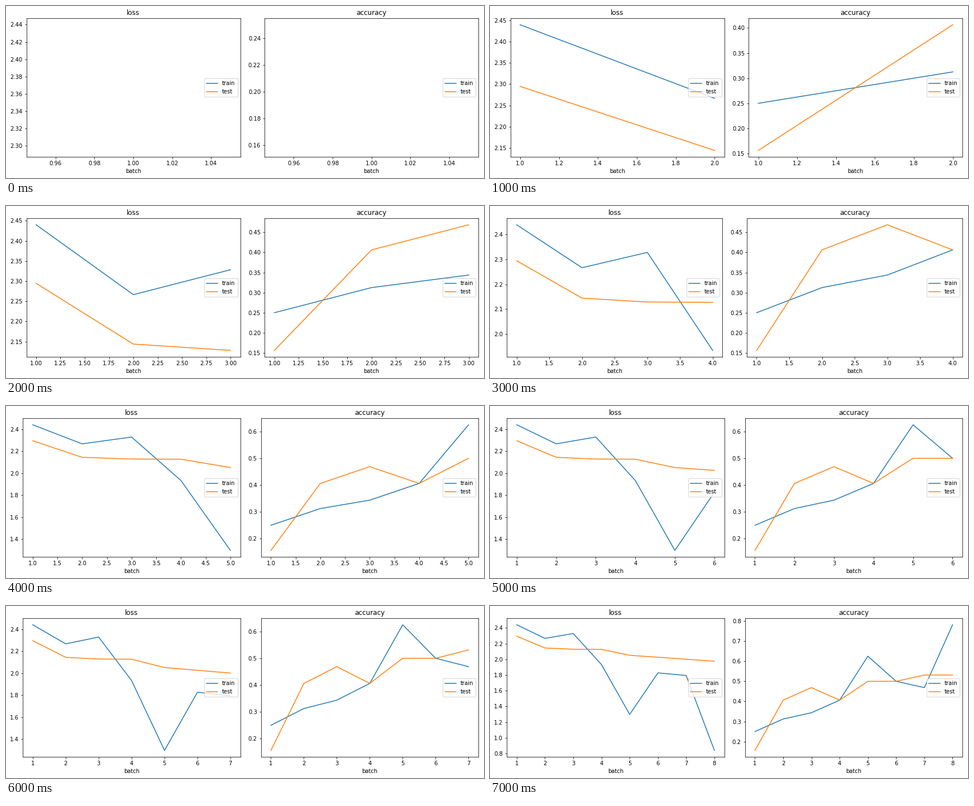
These frames come from a looping animation (856 px wide and 309 px high, 8000 ms). A matplotlib script:

```python
import numpy as np
import matplotlib.pyplot as plt
from matplotlib.animation import FuncAnimation

W, H, DPI = 856, 309, 72
TOP, BOTTOM, RIGHT = 22.46, 270.72, 846.1   # plot edges in pixels from top left
MARGIN, GAP = 14.3, 21.3                    # room beside the tick labels
DIGIT, POINT = 6.36, 3.18                   # glyph widths at 10 pt
BATCHES = 8
SAMPLES = 32                                # accuracy is hits per batch


def share(hits):
    return np.array(hits) / SAMPLES


# uneven key points first, then a steady trend where there is one
CURVES = {
    "loss": {
        "train": [2.4398, 2.2666, 2.3284, 1.933, 1.298, 1.827, 1.794, 0.839],
        "test": [2.2947, 2.144, 2.1283, 2.127, *np.linspace(2.051, 1.976, 4)],
    },
    "accuracy": {
        "train": share([8, 10, 11, 13, 20, 16, 15, 25]),
        "test": share([5, 13, 15, 13, *(16 + k // 2 for k in range(4))]),
    },
}

fig = plt.figure(figsize=(W / DPI, H / DPI), dpi=DPI, facecolor="white")
axes = [fig.add_axes([0.1, 0.1, 0.45, 0.8], label=name) for name in CURVES]


def label_width(ax):
    """Width of the y tick labels, which all read like 2.4 or 2.45."""
    texts = ax.yaxis.get_major_formatter().format_ticks(ax.get_yticks())
    return DIGIT * (max(map(len, texts)) - 1) + POINT


def place(ax, left, width):
    ax.set_position([left / W, 1 - BOTTOM / H, width / W, (BOTTOM - TOP) / H])


def arrange():
    """Give both plots equal width in the room the tick labels leave."""
    first, second = map(label_width, axes)
    left = MARGIN + first
    width = (RIGHT - left - GAP - second) / 2
    place(axes[0], left, width)
    place(axes[1], RIGHT - width, width)


def draw(step):
    count = step + 1
    for ax, (name, curves) in zip(axes, CURVES.items()):
        ax.clear()
        for label, values in curves.items():
            ax.plot(range(1, count + 1), values[:count], label=label)
        ax.set_title(name)
        ax.set_xlabel("batch")
        ax.legend(loc="center right")
    arrange()
    return axes


anim = FuncAnimation(fig, draw, frames=BATCHES, interval=1000,
                     repeat=True, repeat_delay=0, blit=False)
plt.show()
```
